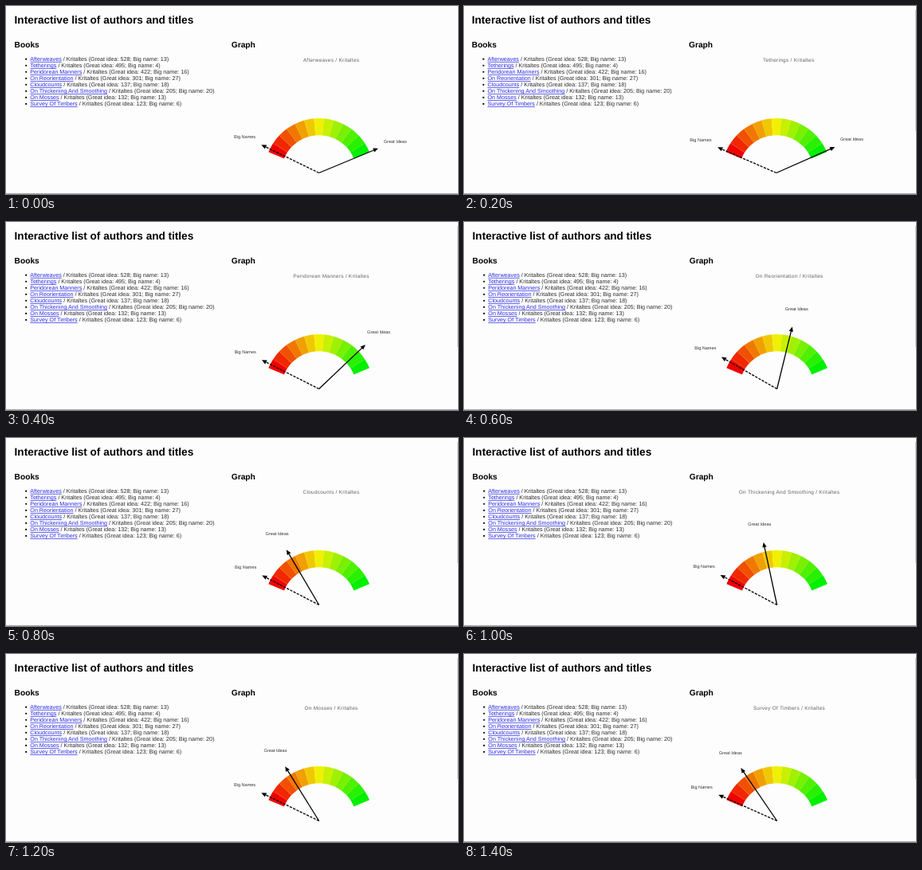
These frames come from a looping animation (567 px wide and 236 px high, 1.6 s). An HTML page:

```html
<!DOCTYPE html>
<html lang="en">
<head>
<meta charset="utf-8">
<title>Interactive list of authors and titles</title>
<style>
  html, body { margin: 0; width: 100%; height: 100%; overflow: hidden; background: #fdfdfd; }
  svg { display: block; width: 567px; height: 236px; font-family: "Liberation Sans", Arial, sans-serif; text-rendering: geometricPrecision; }
  .h1 { font: bold 13.57px "Liberation Sans", Arial, sans-serif; }
  .h2 { font: bold 10.2px "Liberation Sans", Arial, sans-serif; }
  .row { font-size: 7.18px; fill: #2c2c2c; }
  .link { fill: #2c2cea; text-decoration: underline; text-decoration-thickness: .5px; }
  .title { font-size: 6.4px; letter-spacing: .3px; fill: #606060; text-anchor: middle; }
  .label { font-size: 5.55px; fill: #333; text-anchor: middle; }
  .needle { stroke: #000; stroke-width: 1.3; }
  .dashed { stroke-dasharray: 3.2 1.5; }

  .state, #scene, #bar { animation: 1.6s step-end infinite; }
  .state { visibility: hidden; animation-name: show; animation-delay: calc(var(--i) * .2s - 1.6s); }
  #scene { animation-name: nudge; }
  #bar { animation-name: bar; }
  @keyframes show { 0% { visibility: visible; } 12.5%, 100% { visibility: hidden; } }
  @keyframes nudge { 0%, 25%, 100% { transform: none; } 12.5% { transform: translateX(-.8px); } }
  @keyframes bar { 0% { visibility: hidden; } 12.5%, 100% { visibility: visible; } }
</style>
</head>
<body>
<svg viewBox="0 0 567 236">
  <rect width="567" height="236" fill="#fdfdfd"/>
  <g id="scene">
    <text class="h1" x="10.6" y="22">Interactive list of authors and titles</text>
    <text class="h2" x="10.6" y="52">Books</text>
    <text class="h2" x="282.8" y="52">Graph</text>
    <g id="list"></g>
    <g id="gauge"></g>
    <g id="states"></g>
  </g>
  <rect id="bar" x="566" y="5" width="1" height="152" fill="#ccc"/>
  <rect y="235" width="567" height="1" fill="#aaa"/>
</svg>
<script>
  const author = 'Kritaltes';
  // title, great idea score, big name score
  const books = [
    ['Afterweaves', 528, 13],
    ['Tetherings', 495, 4],
    ['Peridorean Manners', 422, 16],
    ['On Reorientation', 301, 27],
    ['Cloudcounts', 137, 18],
    ['On Thickening And Smoothing', 205, 20],
    ['On Mosses', 132, 13],
    ['Survey Of Timbers', 123, 6]
  ];

  const cx = 392.6, cy = 209.5;
  const inner = 47.3, outer = 68.5, reach = 80.4, labelReach = 103.5;
  const spread = 67.5, parts = 13, maxScore = 500;

  const $ = id => document.getElementById(id);
  const toAngle = score => -spread + 2 * spread * Math.min(score / maxScore, 1);

  // Angles are in degrees clockwise from straight up.
  function polar(r, deg) {
    const a = deg * Math.PI / 180;
    return [cx + r * Math.sin(a), cy - r * Math.cos(a)].map(v => v.toFixed(2));
  }

  function listRow([title, idea, name], i) {
    const y = 68.9 + i * 8.03;
    return `<circle cx="25.2" cy="${y - 2.2}" r="1.1"/>
      <text class="row" x="30.3" y="${y}"><tspan class="link">${title}</tspan> / ${author} (Great idea: ${idea}; Big name: ${name})</text>`;
  }

  function segment(i) {
    const step = 2 * spread / parts;
    const from = -spread + i * step, to = from + step;
    const t = 2 * i / (parts - 1);
    const level = v => Math.round(240 * Math.min(v, 1));
    return `<path fill="rgb(${level(2 - t)},${level(t)},0)" d="M${polar(inner, from)}L${polar(outer, from)}
      A${outer} ${outer} 0 0 1 ${polar(outer, to)}L${polar(inner, to)}
      A${inner} ${inner} 0 0 0 ${polar(inner, from)}Z"/>`;
  }

  function arrow(score, label, style) {
    const deg = toAngle(score);
    const [x, y] = polar(labelReach, deg);
    return `<g transform="translate(${cx} ${cy}) rotate(${deg})">
        <path class="needle ${style}" d="M0 0V${4 - reach}"/>
        <path d="M0 ${-reach}l2.7 6.2h-5.4z"/>
      </g>
      <text class="label" x="${x}" y="${+y + 1.8}">${label}</text>`;
  }

  function state([title, idea, name], i) {
    return `<g class="state" style="--i:${i}">
      <text class="title" x="408" y="70.3">${title} / ${author}</text>
      ${arrow(name, 'Big Names', 'dashed')}
      ${arrow(idea, 'Great Ideas', '')}
    </g>`;
  }

  $('list').innerHTML = books.map(listRow).join('');
  $('gauge').innerHTML = Array.from({ length: parts }, (_, i) => segment(i)).join('');
  $('states').innerHTML = books.map(state).join('');
</script>
</body>
</html>
```
